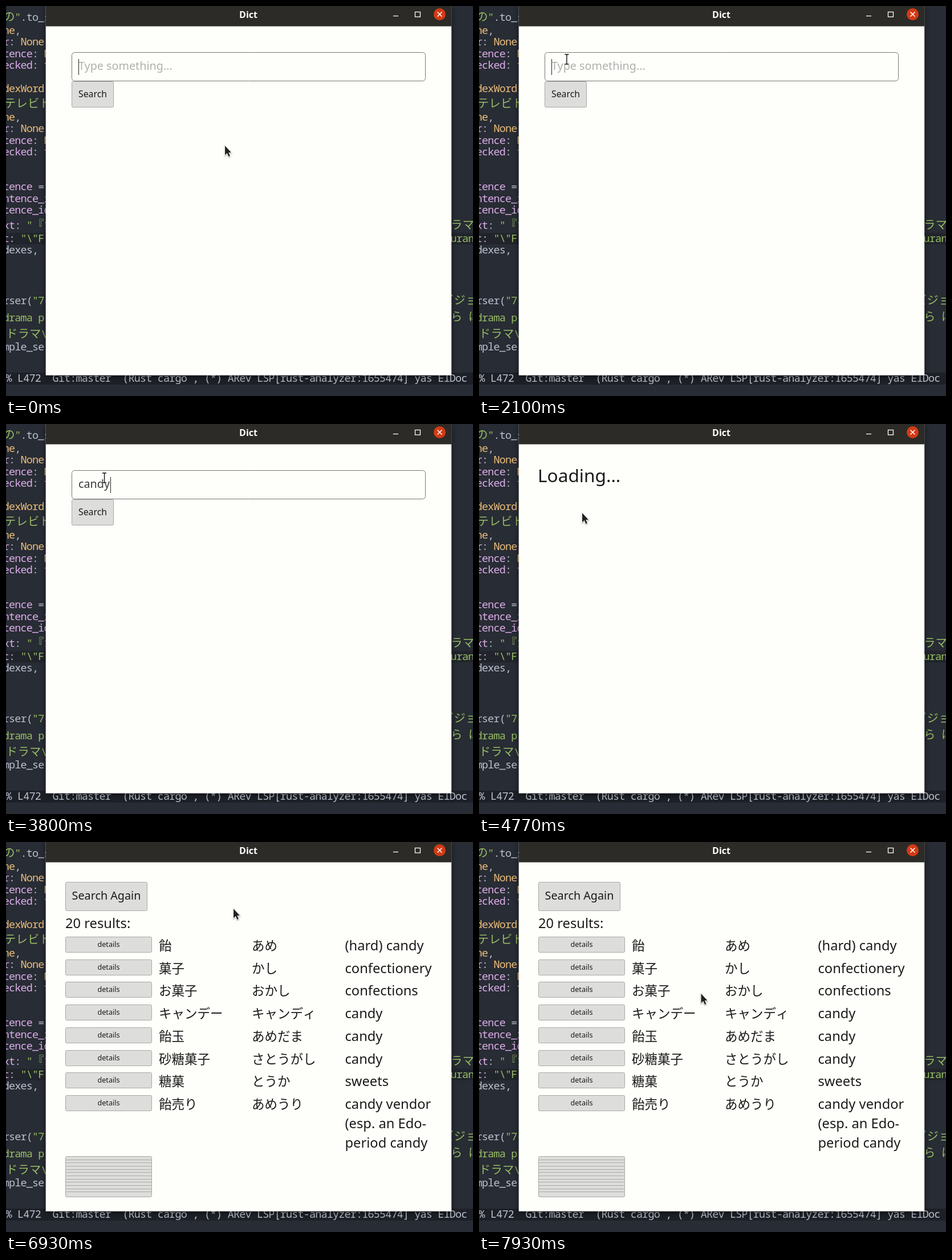
An HTML page with a canvas for the animation above (8000 ms loop, 819 px wide and 684 px high).

```html
<!DOCTYPE html>
<html lang="en">
<head>
<meta charset="utf-8">
<title>Dict</title>
<style>
html, body { margin: 0; width: 100%; height: 100%; overflow: hidden; background: #282c34; }
canvas { display: block; }
</style>
</head>
<body>
<canvas id="stage" width="819" height="684"></canvas>
<script>
const ctx = document.getElementById('stage').getContext('2d');
const LOOP = 8000, CELL = 10.24, BASE = 15.8;
const SANS = '"Noto Sans", "Open Sans", sans-serif';
const CJK = '"Noto Sans CJK JP", "Noto Sans CJK", sans-serif';
const MONO = '18.5px "Noto Sans Mono", monospace';
const INK = { f: '#bbc2cf', y: '#ecbe7b', p: '#dcaeea', g: '#98be65' };

// Editor lines: baseline, x, runs that begin with a colour key
const CODE = [
  [26, -4.7, 'gの"', 'f.to_s'], [49, -4.7, 'yne', 'f,'],
  [69, -4.7, 'pr', 'f: ', 'yNone'], [90, -4.7, 'ptence', 'f: ', 'yN'],
  [110, -4.7, 'pecked', 'f: ', 'yf'], [151, -4.7, 'ydexWord'],
  [178, -3, 'gテレビド'], [201, -4.7, 'yne', 'f,'],
  [221, -4.7, 'pr', 'f: ', 'yNone'], [242, -4.7, 'ptence', 'f: ', 'yN'],
  [262, -4.7, 'pecked', 'f: ', 'yf'], [323, -4.7, 'ptence', 'f ='],
  [344, -4.7, 'pntence_i'], [364, -4.7, 'ptence_id'],
  [391, -4.7, 'pxt', 'f: ', 'g"『1'], [414, -4.7, 'pt', 'f: ', 'g"\\"F'],
  [434, -4.7, 'fdexes,'], [523, -4.7, 'frser(', 'g"7-'],
  [553, -4.7, 'gdrama p'], [582, 0, 'gドラマ\\'], [604, -4.7, 'fmple_se'],
  [391, 780, 'gラマ'], [414, 780, 'guran'], [523, 765, 'gビジョ'], [552, 780, 'gら は'],
  [659, 0, 'f% L472  Git:master  (Rust cargo , (*) ARev LSP[rust-analyzer:1655474] yas ElDoc']
];

const RESULTS = [
  ['飴', 'あめ', '(hard) candy'], ['菓子', 'かし', 'confectionery'],
  ['お菓子', 'おかし', 'confections'], ['キャンデー', 'キャンディ', 'candy'],
  ['飴玉', 'あめだま', 'candy'], ['砂糖菓子', 'さとうがし', 'candy'],
  ['糖菓', 'とうか', 'sweets'], ['飴売り', 'あめうり', 'candy vendor']
];

// Pointer moves: start, steps, ms per step, end x, end y
const MOVES = [
  [500, 7, 100, 150, 93], [1200, 2, 100, 150.5, 93], [1430, 1, 0, 148, 96],
  [2030, 1, 0, 150, 102], [2097, 3, 67, 165, 69],
  [3670, 1, 0, 168, 61], [3716, 5, 46, 181, 156],
  [5400, 1, 0, 193, 155], [5500, 3, 100, 401, 118],
  [6930, 1, 0, 399, 117], [7030, 8, 100, 391, 239],
  [7830, 1, 0, 391, 250], [7930, 1, 0, 389.5, 266]
];
const KEYS = [2400, 2770, 2870, 3170, 3300];
const HOVER = 3854, PRESS = 4670, LOADING = 4770, DONE = 5400;

function text(s, x, y, size, color = '#1a1a1a', align = 'left', font = SANS, weight = 400) {
  ctx.font = `${weight} ${size}px ${font}`;
  ctx.fillStyle = color;
  ctx.textAlign = align;
  ctx.fillText(s, x, y);
}

function box(x, y, w, h, r, fill, line) {
  ctx.beginPath();
  ctx.roundRect(x, y, w, h, r);
  ctx.fillStyle = fill;
  ctx.fill();
  ctx.strokeStyle = line;
  ctx.lineWidth = 1;
  ctx.stroke();
}

function rect(x, y, w, h, color) {
  ctx.fillStyle = color;
  ctx.fillRect(x, y, w, h);
}

function button(x, y, w, h, label, size, baseline, fill = '#dddddb') {
  box(x, y, w, h, 2, fill, '#a9a9a6');
  text(label, x + w / 2, baseline, size, '#1a1a1a', 'center');
}

function path(lines, width, color) {
  ctx.beginPath();
  for (const [x, y, x2, y2] of lines) { ctx.moveTo(x, y); ctx.lineTo(x2, y2); }
  ctx.lineWidth = width;
  ctx.strokeStyle = color;
  ctx.stroke();
}

function editor() {
  rect(0, 0, 819, 684, '#282c34');
  rect(0, 398, 819, 20, '#21242b');
  rect(0, 643, 819, 21, '#1d2026');
  rect(0, 0, 1, 643, '#20232a');
  ctx.textAlign = 'left';
  for (const [y, left, ...runs] of CODE) {
    let x = left;
    for (const run of runs) {
      ctx.fillStyle = INK[run[0]];
      for (const ch of run.slice(1)) {
        const wide = ch > '\u3000', advance = wide ? 2 * CELL : CELL;
        ctx.font = wide ? '300 20px ' + CJK : MONO;
        ctx.fillText(ch, x + (advance - ctx.measureText(ch).width) / 2, y);
        x += advance;
      }
    }
  }
}

function windowFrame() {
  ctx.save();
  ctx.shadowColor = 'rgba(0,0,0,.55)';
  ctx.shadowBlur = 10;
  ctx.shadowOffsetY = 2;
  rect(69.7, 0, 711.5, 647.7, '#fefffa');
  ctx.restore();
  rect(69.7, 0, 711.5, 35.6, '#2c2b27');
  text('Dict', 425, 21, 16, '#fff', 'center', SANS, 700);
  path([[679, 17.5, 688, 17.5]], 1.3, '#fff');
  ctx.lineWidth = 1.3;
  ctx.strokeRect(717.5, 10.5, 9, 8.5);
  ctx.beginPath();
  ctx.arc(760.5, 14.5, 10.5, 0, 7);
  ctx.fillStyle = '#d23a15';
  ctx.fill();
  path([[756.5, 10.5, 764.5, 18.5], [764.5, 10.5, 756.5, 18.5]], 1.5, '#fff');
}

function searchPage(t) {
  const typed = 'candy'.slice(0, KEYS.filter(k => t >= k).length);
  box(115.5, 81.5, 620, 50, 5, '#fefffa', '#777775');
  text(typed || 'Type something...', 127, 112, BASE * 1.25, typed ? '#3a3a3a' : '#b0b0ad');
  const caret = typed ? 128 + ctx.measureText(typed).width : 126.5;
  rect(Math.round(caret), 93, 1, 28, '#222');
  const fill = t >= PRESS ? '#cfcfcc' : t >= HOVER ? '#e5e5e2' : '#dddddb';
  button(115.5, 132.5, 73, 45, 'Search', BASE, 160, fill);
}

function resultsPage() {
  const size = BASE * 1.5;
  button(104.5, 70.5, 143, 50, 'Search Again', BASE * 1.25, 101);
  text('20 results:', 104, 150.5, size);
  RESULTS.forEach(([word, kana, meaning], i) => {
    const dy = i * 39.7;
    button(104.5, Math.round(166 + dy) + .5, 151, 27, 'details', BASE * .8, 184 + dy);
    text(word, 268, 190 + dy, 22.5, '#1a1a1a', 'left', CJK, 300);
    text(kana, 431, 190 + dy, 22.5, '#1a1a1a', 'left', CJK, 300);
    text(meaning, 594.5, 190 + dy, size);
  });
  text('(esp. an Edo-', 594.5, 502, size);
  text('period candy', 594.5, 536, size);
  for (let i = 0; i < 12; i++)
    box(104.5, Math.round(551 + i * 5.65) + .5, 151, 9, 2, '#dddddb', '#a9a9a6');
}

function pointerAt(t) {
  let x = 384, y = 245;
  for (const [start, steps, ms, endX, endY] of MOVES) {
    if (t < start) break;
    const step = ms ? Math.min(steps, 1 + Math.floor((t - start) / ms)) : steps;
    const u = step / steps, k = u * u * (3 - 2 * u);
    x += (endX - x) * k;
    y += (endY - y) * k;
  }
  return [x, y];
}

function pointer(t) {
  const [x, y] = pointerAt(t);
  ctx.save();
  ctx.translate(x, y);
  if (t < LOADING && x > 115 && x < 736 && y > 81 && y < 132) {
    const beam = [[0, -8, 0, 8], [-3.5, -8.5, 3.5, -8.5], [-3.5, 8.5, 3.5, 8.5]];
    path(beam, 3, '#fff');
    path(beam, 1.4, '#111');
  } else {
    const arrow = new Path2D('M0 0V16.5L3.8 13L6.4 19L9 18L6.4 12H11Z');
    ctx.shadowColor = 'rgba(0,0,0,.4)';
    ctx.shadowBlur = 2;
    ctx.shadowOffsetY = 1;
    ctx.lineWidth = 2;
    ctx.strokeStyle = '#fff';
    ctx.stroke(arrow);
    ctx.shadowColor = 'transparent';
    ctx.fillStyle = '#222';
    ctx.fill(arrow);
  }
  ctx.restore();
}

function draw(now) {
  const t = now % LOOP;
  editor();
  windowFrame();
  if (t < LOADING) searchPage(t);
  else if (t < DONE) text('Loading...', 103, 102, BASE * 2);
  else resultsPage();
  pointer(t);
  requestAnimationFrame(draw);
}
requestAnimationFrame(draw);
</script>
</body>
</html>
```
